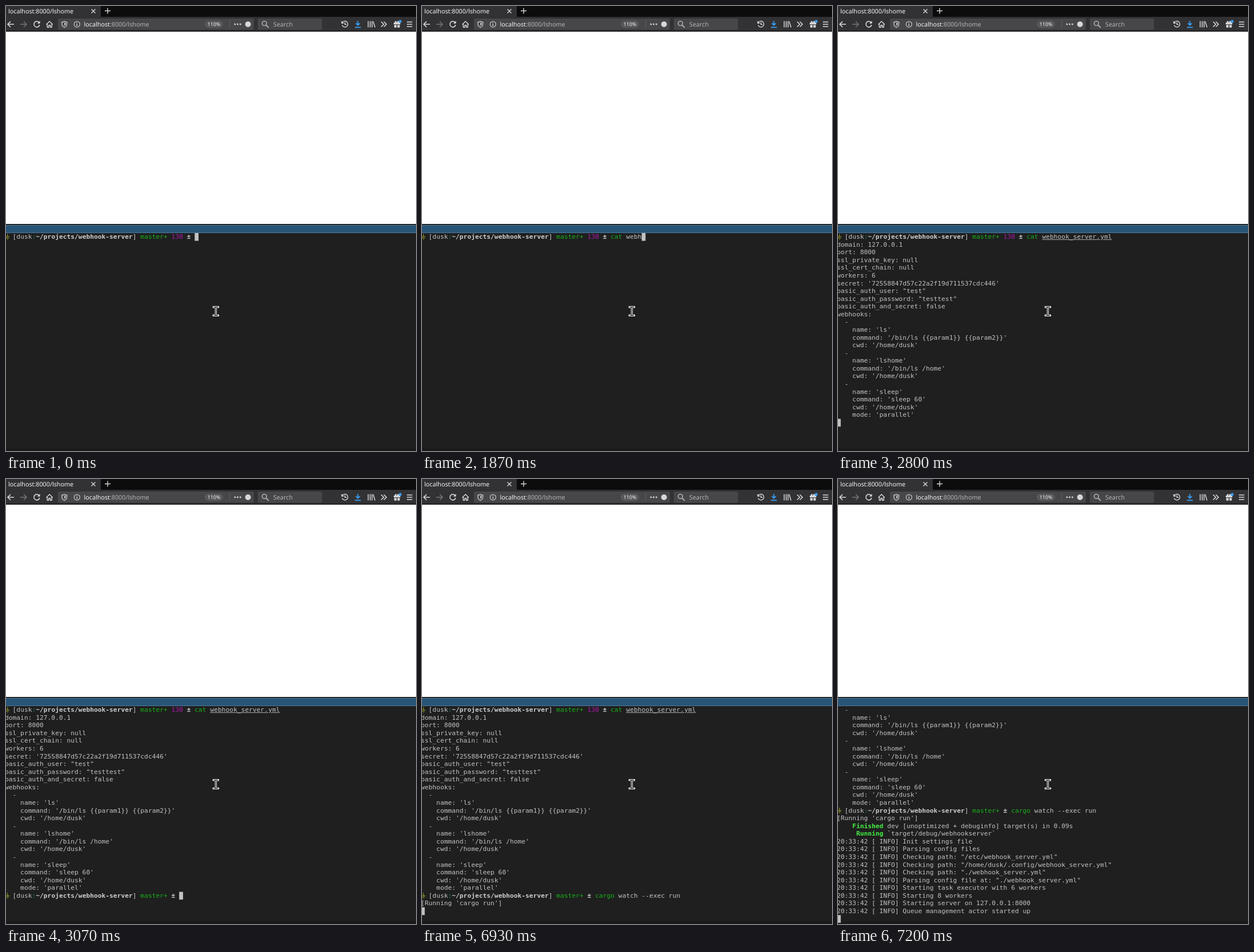
Write an HTML page that moves like this. It is 718 px wide and 780 px high and loops after 8 s.

```html
<!DOCTYPE html>
<html lang="en">
<head>
<meta charset="utf-8">
<title>Webhook server demo</title>
<style>
  html, body { margin: 0; width: 100%; height: 100%; overflow: hidden; background: #1f1f1f; }
  svg.layer { position: absolute; left: 0; top: 0; }
  svg text { font-family: "Noto Sans", "Open Sans", sans-serif; font-size: 10.75px; text-rendering: geometricPrecision; }
  #term {
    position: absolute; left: -2px; top: 398.2px; margin: 0; color: #c2c2c2;
    font: 13.29px/16px "DejaVu Sans Mono", monospace; white-space: pre;
    font-variant-ligatures: none;
    transform: scale(.848); transform-origin: 0 0;
  }
  #term div { height: 16px; }
  #term b { color: #cdcdcd; }
  #term .green { color: #18b218; }
  #term .red { color: #d03030; }
  #term .teal { color: #188a6a; }
  #term .magenta { color: #b218b2; }
  #term b.bright { color: #44f044; }
  .cursor { display: inline-block; width: 8px; height: 16px; background: #c2c2c2; vertical-align: top; }
  .ground { display: inline-block; width: 16px; height: 16px; vertical-align: top; }
</style>
</head>
<body>
<svg class="layer" width="718" height="780" fill="none" stroke="#d7d7db" stroke-width="1.4">
  <!-- window backgrounds -->
  <g stroke="none">
    <path fill="#0c0c0d" d="M0 0H718V19H0z"/>
    <path fill="#323234" d="M0 0H166V19H718V44H0z"/>
    <path fill="#18181a" d="M0 43.5H718V45H0z"/>
    <path fill="#fff" d="M0 45H718V382H0z"/>
    <path fill="#1c2023" d="M0 382H718V384H0z"/>
    <path fill="#4c7899" d="M0 384H718V398H0z"/>
    <path fill="#285577" d="M0 385H718V397H0z"/>
    <path fill="#1f1f1f" d="M0 398H718V780H0z"/>
    <path fill="#17191a" d="M0 776H718V780H0z"/>
    <g fill="#474749">
      <rect x="91" y="22" width="343" height="19.5" rx="2"/>
      <rect x="441" y="22" width="112.5" height="19.5" rx="2"/>
    </g>
    <rect x="348" y="25.5" width="32" height="13" rx="6.5" fill="#58585a"/>
    <path fill="#5c5c5e" d="M391 25h1v14h-1z"/>
  </g>

  <!-- labels -->
  <g stroke="none" fill="#f4f4f5">
    <text x="4" y="13">localhost:8000/lshome</text>
    <text x="136.5" y="36">localhost<tspan fill="#b4b4b6">:8000/lshome</tspan></text>
    <text x="353" y="35.3" style="font-size:8.8px">110%</text>
    <text x="468" y="35.5" fill="#b4b4b6">Search</text>
  </g>

  <!-- icons -->
  <path d="M149.5 5.5l7 7m0-7l-7 7M178 3.5v10m-5-5h10"/>
  <path d="M14 32H3m5-5l-5 5l5 5" stroke-width="1.6"/>
  <path d="M25 32H36m-5-5l5 5l-5 5" stroke="#77777a"/>
  <path d="M58 29a5 5 0 1 0 .8 4" stroke-width="1.6"/>
  <path d="M59.5 26v4.7h-4.7z" fill="#d7d7db" stroke="none"/>
  <path d="M70.5 32.5l5.7-5.5l5.7 5.5M72.3 31.5v5.7h2.6v-3.5h2.6v3.5h2.6v-5.7"/>
  <path d="M98 28.2q2.5 0 4.3-1.2q1.8 1.2 4.3 1.2v3.3q0 4-4.3 6q-4.3-2-4.3-6z" stroke-width="1.2"/>
  <path d="M102.3 29v6q2.3-1.3 2.3-4v-1.3q-1.3-.2-2.3-.7z" fill="#d7d7db" stroke="none"/>
  <circle cx="124.3" cy="32" r="5" stroke-width="1.1"/>
  <path d="M124.3 31.2v3.7m0-6.2v1.3"/>
  <g fill="#d7d7db" stroke="none">
    <circle cx="401" cy="32" r="1.4"/><circle cx="405.7" cy="32" r="1.4"/><circle cx="410.4" cy="32" r="1.4"/>
    <circle cx="423.8" cy="32" r="5"/>
  </g>
  <g stroke="#c0c0c3"><circle cx="452.5" cy="30.5" r="3.9"/><path d="M455.3 33.3l4.7 4.7" stroke-width="1.7"/></g>
  <path d="M588.8 29.5a5.2 5.2 0 1 1-.2 4M593.5 28.5v3.8h3M588 26.5v3.5h3.5"/>
  <path d="M616.2 26v7.5m-3.5-3.3l3.5 3.5l3.5-3.5M611 37.3h10.4" stroke="#39a0f8" stroke-width="1.7"/>
  <path d="M634.3 26.5v11m3.4-11v11m3.3-11v11m2-10.5l3.2 10.5" stroke-width="1.5"/>
  <path d="M657 27.5l4.5 4.5l-4.5 4.5m4.7-9l4.5 4.5l-4.5 4.5" stroke-width="1.6"/>
  <g fill="#d7d7db" stroke="none">
    <path d="M679 29h11.5v3.3H679zM679.8 33.2h4.2v4.5h-4.2zM685.4 33.2h4.2v4.5h-4.2z"/>
    <circle cx="682.5" cy="28" r="1.7"/><circle cx="686.5" cy="28" r="1.7"/>
    <circle cx="690.3" cy="27" r="2.5" fill="#39a0f8"/>
  </g>
  <path d="M702 28h9.5m-9.5 4h9.5m-9.5 4h9.5"/>
</svg>

<div id="term"></div>

<!-- text pointer -->
<svg class="layer" width="718" height="780" fill="none">
  <g id="beam">
    <path d="M363.5 527.7h8M367.5 527.7v14.6M363.5 542.3h8" stroke="#fff" stroke-width="3.2" stroke-linecap="square"/>
    <path d="M363.5 527.7h8M367.5 527.7v14.6M363.5 542.3h8" stroke="#111" stroke-width="1.2"/>
  </g>
</svg>

<script>
const LOOP = 8000, ROWS = 28;
const term = document.getElementById('term');
const CURSOR = '<span class="cursor"></span>';
const GROUND = '<svg class="ground" fill="none" stroke="#a0a02a" stroke-width="1.2">' +
  '<path d="M5.5 2v6M1.5 8h8M3 10.5h5M4.5 13h2"/></svg>';
const paint = (color, s) => `<span class="${color}">${s}</span>`;
const green = s => paint('green', s);

const prompt = status => GROUND + '[dusk' + paint('teal', ':') + '<b>~/projects/webhook-server</b>] ' +
  green('master+') + (status ? ' ' + paint('magenta', status) : '') + ' <b>±</b> ';
const first = prompt('130'), second = prompt('');
const catFile = green('cat') + ' <u>webhook_server.yml</u>';
const cargo = green('cargo') + ' watch --exec run';

const config = `domain: 127.0.0.1
port: 8000
ssl_private_key: null
ssl_cert_chain: null
workers: 6
secret: '72558847d57c22a2f19d711537cdc446'
basic_auth_user: "test"
basic_auth_password: "testtest"
basic_auth_and_secret: false
webhooks:
  -
    name: 'ls'
    command: '/bin/ls {{param1}} {{param2}}'
    cwd: '/home/dusk'
  -
    name: 'lshome'
    command: '/bin/ls /home'
    cwd: '/home/dusk'
  -
    name: 'sleep'
    command: 'sleep 60'
    cwd: '/home/dusk'
    mode: 'parallel'`.split('\n');

const build = [
  '    <b class="bright">Finished</b> dev [unoptimized + debuginfo] target(s) in 0.09s',
  '     <b class="bright">Running</b> `target/debug/webhookserver`'
];
const log = `Init settings file
Parsing config files
Checking path: "/etc/webhook_server.yml"
Checking path: "/home/dusk/.config/webhook_server.yml"
Checking path: "./webhook_server.yml"
Parsing config file at: "./webhook_server.yml"
Starting task executor with 6 workers
Starting 8 workers
Starting server on 127.0.0.1:8000
Queue management actor started up`.split('\n').map(s => '20:33:42 [ INFO] ' + s);

// Each step: start time and the screen's lines; the cursor follows the last one.
const typed = s => [first + green('cat') + ' ' + s];
const shown = [first + catFile, ...config];
const started = [...shown, second + cargo, "[Running 'cargo run']"];
const steps = [
  [0, [first]],
  [600, [first + paint('red', 'c')]],
  [730, [first + paint('red', 'ca')]],
  [870, [first + green('cat')]],
  [1000, typed('')],
  [1600, typed('w')],
  [1670, typed('we')],
  [1730, typed('web')],
  [1800, typed('webh')],
  [1930, typed('webho')],
  [2130, [first + catFile + ' ']],
  [2730, [first + catFile, '']],
  [2800, [...shown, '']],
  [2930, [...shown, second]],
  [5930, [...shown, second + catFile]],
  [6070, [...shown, second + cargo]],
  [6870, [...shown, second + cargo, '']],
  [6930, [...started, '']],
  [7070, [...started, ...build, '']],
  [7130, [...started, ...build, ...log.slice(0, -1), '']],
  [7200, [...started, ...build, ...log, '']]
];

const begin = performance.now();
let current;
function draw() {
  const t = (performance.now() - begin) % LOOP;
  const step = steps.findLast(([time]) => time <= t);
  if (step !== current) {
    current = step;
    const lines = step[1].slice(-ROWS);
    term.innerHTML = lines.map((line, i) =>
      `<div>${line}${i === lines.length - 1 ? CURSOR : ''}</div>`).join('');
  }
  requestAnimationFrame(draw);
}
draw();
</script>
</body>
</html>
```
